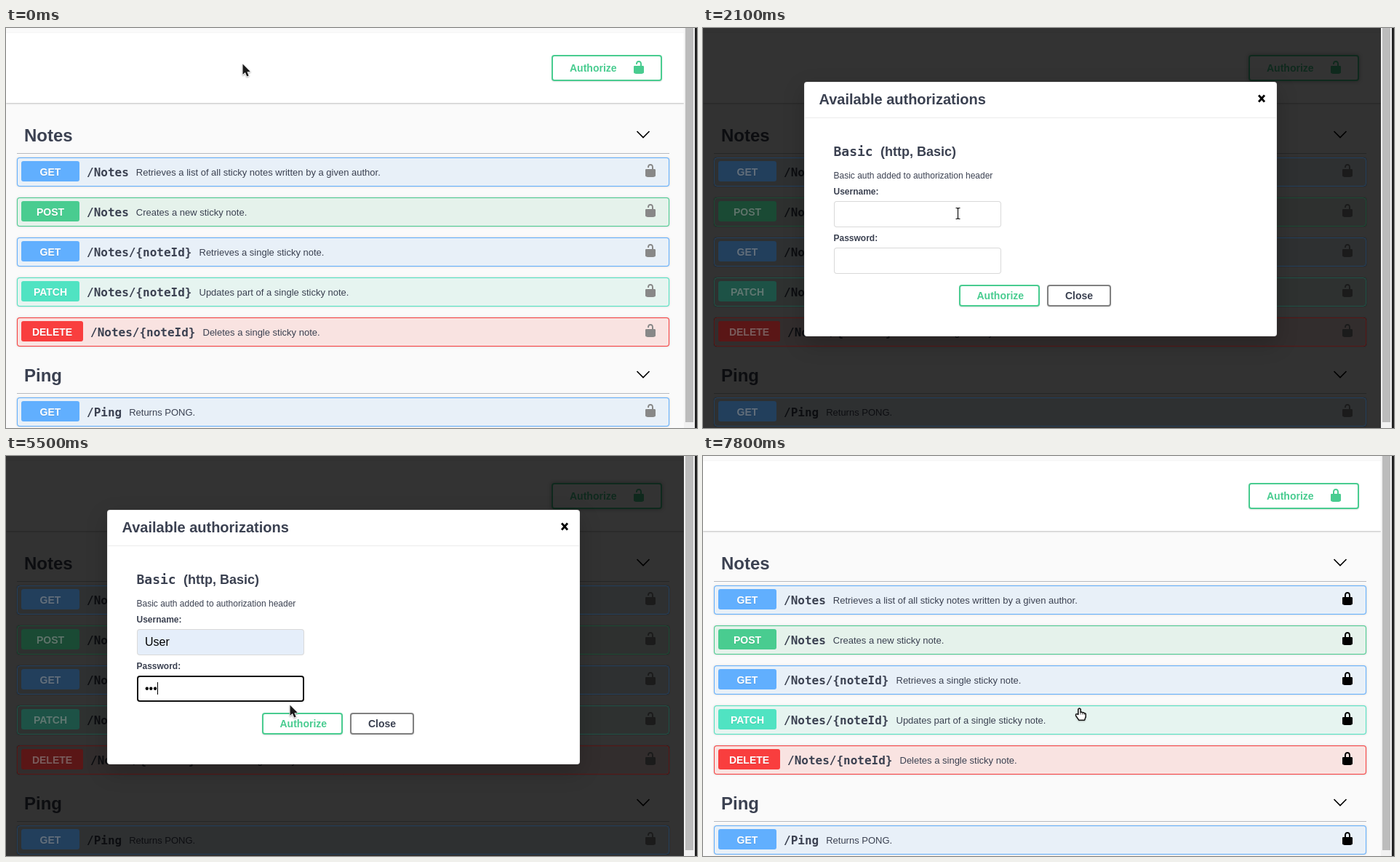
Recreate the animation shown at these times as an HTML page with a canvas. Size 950 by 550 pixels, loop 8 s.

```html
<!DOCTYPE html>
<html lang="en">
<head>
<meta charset="utf-8">
<title>API authorization</title>
<style>
html, body { margin: 0; width: 100%; height: 100%; overflow: hidden; background: #fafafa; }
canvas { display: block; }
</style>
</head>
<body>
<canvas id="stage" width="950" height="550"></canvas>
<script>
const ctx = document.getElementById('stage').getContext('2d');
const LOOP = 8000, STEP = 100;
const SANS = '"Liberation Sans", Arial, sans-serif';
const MONO = '"DejaVu Sans Mono", monospace';
const INK = '#3b4151', GREEN = '#49cc90', LOGIN = 'User';

// Times of the state changes
const T = { open: 1100, focusUser: 2200, list: 2400, preview: 3000, pick: 3400,
  focusPass: 4500, twoDots: 4900, threeDots: 5100, blink: 5600, login: 6300, close: 7800 };

const METHODS = {
  GET: ['#61affe', '#e8f0f8'],
  POST: ['#49cc90', '#e5f2eb'],
  PATCH: ['#50e3c2', '#e6f4f0'],
  DELETE: ['#f93e3e', '#f9e3e1']
};
const ROWS = [
  [178, 'GET', '/Notes', 'Retrieves a list of all sticky notes written by a given author.'],
  [233, 'POST', '/Notes', 'Creates a new sticky note.'],
  [288, 'GET', '/Notes/{noteId}', 'Retrieves a single sticky note.'],
  [343, 'PATCH', '/Notes/{noteId}', 'Updates part of a single sticky note.'],
  [398, 'DELETE', '/Notes/{noteId}', 'Deletes a single sticky note.'],
  [508, 'GET', '/Ping', 'Returns PONG.']
];

// Pointer stops: time, x, y
const STOPS = [
  [0, 325, 49], [400, 609, 60], [500, 609, 60], [1000, 802, 60], [1200, 800, 60],
  [1800, 378, 227], [1900, 378, 227], [2100, 350, 255], [2700, 350, 255],
  [3200, 322, 304], [3300, 322, 304], [3400, 323, 310], [3600, 323, 310],
  [4000, 502, 330], [4400, 502, 330], [4500, 380, 322], [4600, 345, 362],
  [5200, 345, 362], [5500, 390, 342], [5900, 396, 363], [6900, 396, 363],
  [7400, 517, 346], [LOOP, 517, 346]
];

const LOCK_BODY = 'H4c-.553 0-1 .646-1 1.199V17c0 .549.428 1.139.951 1.307l1.197.387' +
  'C5.672 18.861 6.55 19 7.1 19h5.8c.549 0 1.428-.139 1.951-.307l1.196-.387' +
  'c.524-.167.953-.757.953-1.306V9.199C17 8.646 16.352 8 15.8 8z';
const SHACKLE = 'M15.8 8H14V5.6C14 2.703 12.665 1 10 1 7.334 1 6 2.703 6 5.6';
const UNLOCKED = new Path2D(SHACKLE +
  'V6h2v-.801C8 3.754 8.797 3 10 3c1.203 0 2 .754 2 2.199V8' + LOCK_BODY);
const LOCKED = new Path2D(SHACKLE + 'V8' + LOCK_BODY +
  'M12 8H8V5.199C8 3.754 8.797 3 10 3c1.203 0 2 .754 2 2.199V8z');
const ARROW = new Path2D('M0 0V14.6L3.4 11.5 5.7 17 8.2 15.9 5.9 10.7 10.4 10.4Z');
const HAND = new Path2D('M-1.5 9V1.7Q0-.5 1.5 1.7V6Q3 5 4.2 6.4 5.6 5.7 6.6 7.1 8.6 6.8 8.6 9' +
  'V12L7 16.6H-.6L-4.8 10.6Q-5.6 8-3.5 8.4Z');
const IBEAM = new Path2D('M-3-7.5H-1L0-6.5 1-7.5H3M0-6.5V6.5M-3 7.5H-1L0 6.5 1 7.5H3');

const clamp = v => Math.min(1, Math.max(0, v));
const ease = v => v * v * (3 - 2 * v);
const mix = (a, b, k) => a + (b - a) * k;
const within = (p, x, y, w, h) => p.x >= x && p.x <= x + w && p.y >= y && p.y <= y + h;
const fade = (t, start) => ease(clamp((t - start) / 300));

function text(str, x, y, font, color = INK, align = 'left') {
  ctx.font = font;
  ctx.fillStyle = color;
  ctx.textAlign = align;
  ctx.fillText(str, x, y);
}

function rect(x, y, w, h, color) {
  ctx.fillStyle = color;
  ctx.fillRect(x, y, w, h);
}

function box(x, y, w, h, { fill, line, width = 1, radius = 4, shadow }) {
  ctx.save();
  if (shadow) [ctx.shadowColor, ctx.shadowBlur, ctx.shadowOffsetY] = shadow;
  ctx.beginPath();
  ctx.roundRect(x, y, w, h, radius);
  ctx.fillStyle = line || fill;
  ctx.fill();
  ctx.restore();
  if (!line) return;
  ctx.beginPath();
  ctx.roundRect(x + width, y + width, w - 2 * width, h - 2 * width, radius - width);
  ctx.fillStyle = fill;
  ctx.fill();
}

function button(x, y, w, h, label, labelX, line, color, hover = 0, fill = '#fff') {
  const shadow = [`rgba(0,0,0,${mix(0.12, 0.32, hover)})`, mix(2, 6, hover), 1 - hover];
  box(x, y, w, h, { fill, line, width: 2, shadow });
  text(label, labelX, y + h / 2 + 5, `bold 14px ${SANS}`, color);
}

function lock(x, y, closed, color) {
  ctx.save();
  ctx.translate(x, y);
  ctx.fillStyle = color;
  ctx.fill(closed ? LOCKED : UNLOCKED, 'evenodd');
  ctx.restore();
}

function cross(x, y) {
  ctx.strokeStyle = '#000';
  ctx.lineWidth = 2.7;
  ctx.beginPath();
  for (const s of [-1, 1]) {
    ctx.moveTo(x - 4 * s, y - 4.5);
    ctx.lineTo(x + 4 * s, y + 4.5);
  }
  ctx.stroke();
}

function section(name, y) {
  text(name, 25, y + 9, `bold 24px ${SANS}`);
  ctx.strokeStyle = '#000';
  ctx.lineWidth = 1.7;
  ctx.beginPath();
  ctx.moveTo(867.5, y - 5);
  ctx.lineTo(876, y + 3.5);
  ctx.lineTo(884.5, y - 5);
  ctx.stroke();
  rect(15, y + 25, 897, 1, 'rgba(59,65,81,.35)');
}

function badge(y, method) {
  const w = method === 'DELETE' ? 85 : 80;
  box(21, y + 5, w, 28, { fill: METHODS[method][0], radius: 3 });
  const font = `bold 14px ${SANS}`;
  text(method, 21 + w / 2, y + 26, font, 'rgba(0,0,0,.1)', 'center');
  text(method, 21 + w / 2, y + 25, font, '#fff', 'center');
  return 31 + w;
}

function row([y, method, path, summary], closed) {
  const [line, fill] = METHODS[method];
  box(15, y, 897, 40, { fill, line, shadow: ['rgba(0,0,0,.19)', 3, 0] });
  const x = badge(y, method);
  text(path, x, y + 26, `bold 16px ${MONO}`);
  const end = x + ctx.measureText(path).width + 10;
  text(summary, end, y + 25, `13px ${SANS}`);
  lock(876, y + 8, closed, closed ? '#000' : '#888');
}

function page(closed, hover) {
  rect(0, 0, 950, 550, '#fafafa');
  box(0, 7, 932, 96, { fill: '#fff', radius: 0, shadow: ['rgba(0,0,0,.25)', 2, 1] });
  button(750, 37, 152, 36, 'Authorize', 775, GREEN, GREEN, hover);
  lock(860, 44, closed, GREEN);
  section('Notes', 147);
  section('Ping', 477);
  ROWS.forEach(r => row(r, closed));
}

function backdrop() {
  rect(0, 0, 932, 550, 'rgba(0,0,0,.8)');
  // Coloured accents stay a little brighter than the rest
  ctx.save();
  ctx.globalAlpha = 0.2;
  ctx.lineWidth = 1;
  for (const [y, method] of ROWS) {
    badge(y, method);
    ctx.strokeStyle = METHODS[method][0];
    ctx.beginPath();
    ctx.roundRect(15.5, y + 0.5, 896, 39, 4);
    ctx.stroke();
  }
  ctx.restore();
}

function scrollbar() {
  rect(932, 0, 15, 550, '#f1f1f1');
  rect(934, 0, 11, 542, '#bcbcbc');
  rect(947, 0, 3, 550, '#222');
}

function modal(y, h) {
  box(139, y, 650, h, { fill: '#fff', line: '#ebebeb', shadow: ['rgba(0,0,0,.2)', 30, 10] });
  rect(139, y + 49, 650, 1, '#ebebeb');
  text('Available authorizations', 159.5, y + 30.5, `bold 20px ${SANS}`);
  cross(768, y + 23);
  text('Basic', 179.5, y + 102, `bold 18px ${MONO}`);
  text('(http, Basic)', 244, y + 102, `bold 18px ${SANS}`);
}

const note = y => text('Basic auth added to authorization header', 179.5, y, `12px ${SANS}`);
const label = (str, y) => text(str, 179.5, y, `bold 12px ${SANS}`);

function field(y, value, focused, filled, caret) {
  box(180, y, 230, 36, {
    fill: filled ? '#e5eefa' : '#fff',
    line: focused ? '#101010' : '#d9d9d9',
    width: focused ? 2 : 1
  });
  text(value, 191, y + 23, `16px ${SANS}`, '#000');
  if (caret) rect(Math.round(191 + ctx.measureText(value).width), y + 9, 1, 17, '#000');
}

function loginForm(t) {
  modal(74, 350);
  note(207);
  label('Username:', 229);
  const onUser = t >= T.focusUser && t < T.focusPass;
  const named = t >= T.preview;
  const userCaret = onUser && (t < T.preview || t >= T.pick);
  field(238, named ? LOGIN : '', onUser, named, userCaret);
  label('Password:', 293);
  const dots = t >= T.threeDots ? 3 : t >= T.twoDots ? 2 : 0;
  const onPass = t >= T.focusPass;
  field(302, '•'.repeat(dots), onPass, false, onPass && t < T.blink);
  button(352, 353, 111, 30, 'Authorize', 376.5, GREEN, GREEN, fade(t, 5500));
  button(473, 353, 88, 30, 'Close', 498, '#808080', INK);
  if (t >= T.list && t < T.pick) suggestions(t >= T.preview);
}

function suggestions(hot) {
  box(180, 276, 236, 230, { fill: '#fff', radius: 3, shadow: ['rgba(0,0,0,.35)', 4, 1] });
  if (hot) rect(180, 284, 236, 38, '#e8e8e8');
  text(LOGIN, 191, 308, `14px ${SANS}`, '#202124');
}

function blend(from, to, k) {
  return `rgb(${from.map((c, i) => Math.round(mix(c, to[i], k)))})`;
}

function account(t) {
  modal(95.75, 306);
  text('Authorized', 179.5, 236.5, `bold 10.72px ${SANS}`);
  note(274.5);
  label('Username:', 297.5);
  text(LOGIN, 251, 297.5, `16px ${MONO}`);
  label('Password:', 316.5);
  text('******', 250, 317, `16px ${MONO}`);
  const k = fade(t, T.login - STEP);
  const green = [73, 204, 144];
  button(364, 330.75, 97, 30, 'Logout', 388.5, blend(green, [128, 128, 128], k),
    blend(green, [59, 65, 81], k), 1 - k);
  button(461, 330.75, 88, 30, 'Close', 486.5, '#808080', INK, fade(t, 7100));
}

function pointerAt(t) {
  const i = STOPS.findIndex(s => s[0] > t);
  const [a, b] = [STOPS[i - 1], STOPS[i]];
  const k = ease((t - a[0]) / (b[0] - a[0]));
  return { x: mix(a[1], b[1], k), y: mix(a[2], b[2], k) };
}

function pointerKind(t, p) {
  if (t < T.open || t >= T.close) {
    const clickable = within(p, 750, 37, 152, 36) || ROWS.some(r => within(p, 15, r[0], 897, 40));
    return clickable ? 'hand' : 'arrow';
  }
  if (t >= T.login) return within(p, 364, 331, 185, 30) ? 'hand' : 'arrow';
  if (t >= T.list && t < T.pick && within(p, 180, 276, 236, 230)) return 'arrow';
  if (within(p, 180, 238, 230, 36) || within(p, 180, 302, 230, 36)) return 'ibeam';
  return within(p, 352, 353, 111, 30) || within(p, 473, 353, 88, 30) ? 'hand' : 'arrow';
}

function pointer(t) {
  const p = pointerAt(t), kind = pointerKind(t, p);
  ctx.save();
  ctx.translate(Math.round(p.x), Math.round(p.y));
  ctx.lineJoin = 'round';
  if (kind === 'ibeam') {
    ctx.translate(0.5, 0);
    ctx.strokeStyle = '#fff';
    ctx.lineWidth = 3;
    ctx.stroke(IBEAM);
    ctx.strokeStyle = '#111';
    ctx.lineWidth = 1.2;
    ctx.stroke(IBEAM);
  } else {
    const hand = kind === 'hand';
    const path = hand ? HAND : ARROW;
    ctx.translate(0.5, 0.5);
    ctx.shadowColor = 'rgba(0,0,0,.35)';
    ctx.shadowBlur = 2;
    ctx.shadowOffsetY = 1;
    ctx.strokeStyle = hand ? '#111' : '#fff';
    ctx.lineWidth = hand ? 1.3 : 1.6;
    ctx.stroke(path);
    ctx.shadowColor = 'transparent';
    ctx.fillStyle = hand ? '#fff' : '#1a1a1a';
    ctx.fill(path);
    if (hand) {
      ctx.stroke(path);
      ctx.lineWidth = 0.8;
      ctx.stroke(new Path2D('M1.5 6V9M4.2 6.5V9M6.6 7.2V9.4'));
    }
  }
  ctx.restore();
}

function draw(t) {
  const opened = t >= T.open && t < T.close;
  const hover = t < T.close ? fade(t, 800) : 0;
  page(t >= T.login, hover);
  if (opened) {
    backdrop();
    if (t < T.login) loginForm(t);
    else account(t);
  }
  scrollbar();
  pointer(t);
}

function tick() {
  const t = performance.now() % LOOP;
  draw(Math.floor(t / STEP) * STEP);
  requestAnimationFrame(tick);
}
tick();
</script>
</body>
</html>
```
